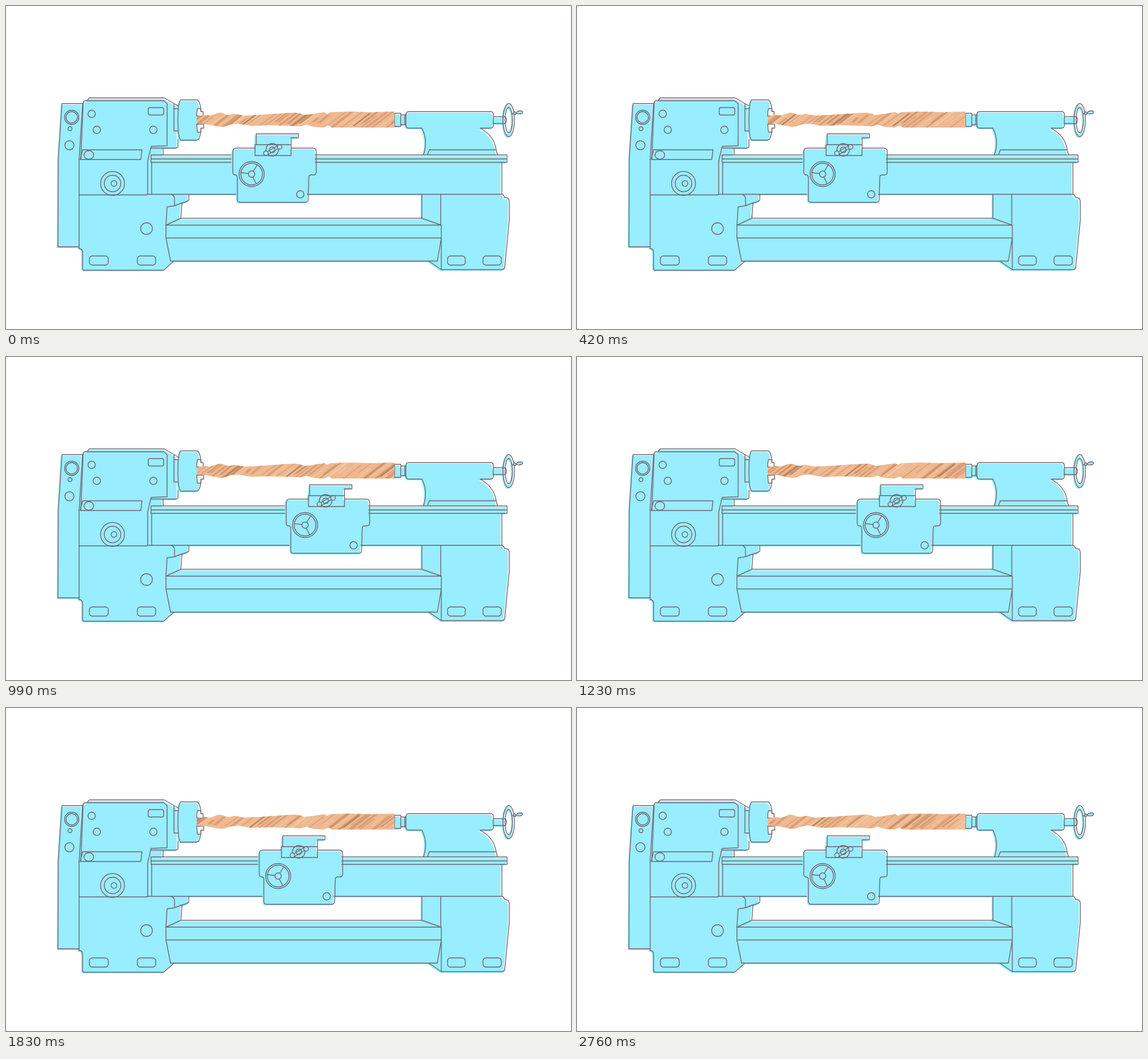
An HTML page that plays this animation: 989 px wide and 566 px high, repeating every 2.97 s.

```html
<!DOCTYPE html>
<html lang="en">
<head>
<meta charset="utf-8">
<title>Lathe</title>
<style>
html, body { margin: 0; width: 100%; height: 100%; overflow: hidden; background: #fff; }
svg { display: block; width: 989px; height: 566px; }
.fill { fill: #98edff; transform: translate(-2.2px, 2px); }
.line { fill: none; stroke: #6f646c; stroke-width: 1.4; stroke-linejoin: round; stroke-linecap: round; }
</style>
</head>
<body>
<svg viewBox="0 0 989 566">
  <defs>
    <clipPath id="blank">
      <path d="M334 194L346 191L358 192L369 188Q377 185 384 190Q391 192 400 189L416 192L441 191L470 189L500 187Q513 186 522 191L531 190L557 186L562 189L568 186L600 185L640 186L680 185V213H570Q565 207 561 211L556 213L540 212L526 208L515 211L500 210L460 209L430 210L405 206Q391 207 384 211Q376 213 366 210L350 207L334 206Z"/>
    </clipPath>
  </defs>

  <g class="fill">
    <path d="M98 171H134L131 269H128V422H91L92 268Z"/>
    <path d="M135 170Q135 166 139 166H143V164L146 161H277L294 171L301 175V247L298 249H275V261H254V330H320V340Q318 345 308 346L306 372L280 384V406L288 447H293L276 463H137Q134 463 134 460V432Q134 425 128 425V269H131Z"/>
    <path d="M306 164.500H334Q339 165 341 180V220Q339 235 334 235H306Q301 232 301 200Q301 167 306 164.500Z"/>
    <path d="M254 261H877V274H868V330H254Z"/>
    <path d="M306 372H728V330H868Q872 331 872 335L879 337Q881 339 881 345V375L873 458Q872 462 868 462H762L740 447H288L280 406V384Z"/>
    <path d="M680 188H691V191H700Q700 185 705 185H848Q853 185 853 190V194H874V206H853V209Q853 214 848 214H830Q855 228 858 252L860 260H731Q738 235 728 214H705Q700 214 700 208H691V211H680Z"/>
    <path fill-rule="evenodd" d="M870 200a10 29 0 1 1 20 0a10 29 0 1 1 -20 0M873.500 200a6.500 22 0 1 0 13 0a6.500 22 0 1 0 -13 0"/>
  </g>

  <g class="line">
    <path d="M134 171H98L91.500 268L91 422H128M134 171L128 269"/>
    <path d="M143 166V164L146 161H277L294 171L301 175M131 269L135 170Q135 166 139 166H276L282 171V245L254 246L248 272V330M294 171V180H301M294 180V219H301"/>
    <path d="M301 234V247L298 249H254M275 249V261M134 252H238L236 269H130ZM128 269V425Q134 425 134 432V460Q134 463 137 463H276L293 448M128 331H247"/>
    <path d="M306 164.500H334Q339 165 341 180V220Q339 235 334 235H306Q301 232 301 200Q301 167 306 164.500Z"/>
    <path d="M254 261H877V274H254ZM254 268H877M255 274V330M247 330H868V274"/>
    <path d="M289 330Q295 332 295 338V350L282 352L280 384M320 330V340Q318 343 308 345L295 350M308 346L306 372"/>
    <path d="M306 372H728L762 384H280ZM280 384V406.500H762V384M280 406.500L288 447H755L762 406.500M728 330V372M761 330V384M762 406.500V462"/>
    <path d="M868 330Q872 331 872 335L879 337Q881 339 881 345V375L873 458Q872 462 868 462H762L740 447"/>
    <path d="M680 188H691V211H680ZM691 191H700M691 208H700M698 191V208"/>
    <path d="M728 214H705Q700 214 700 208V191Q700 185 705 185H848Q853 185 853 190V209Q853 214 848 214H830Q855 228 858 252H741L738 260M728 214Q739 235 731 260M858 252L860 260"/>
    <path d="M853 194H874Q878 200 874 206H853"/>
    <ellipse cx="880" cy="200" rx="10" ry="29"/><ellipse cx="880" cy="200" rx="6.500" ry="22"/>
    <path fill="#98edff" d="M887 189L890 185L893 187Q896 183 903 184Q906 187 902 188.500Q896 190 893 188L892 190Z"/>
    <ellipse cx="145" cy="261" rx="8.500" ry="7.500"/>
    <g id="details"></g>
  </g>

  <path class="line" style="fill:#fff" d="M335 180H341V185H345V193H334V187ZM334 207H346V214H341V221H335Z"/>

  <g clip-path="url(#blank)">
    <path fill="#eeb88f" d="M330 180H684V218H330Z"/>
    <g id="grain"></g>
  </g>

  <g id="carriage">
    <g class="fill">
      <path d="M403 249H537Q543 249 543 255V291Q543 296 538 296H535Q530 296 530 300L529 339Q529 344 524 344H410Q405 344 405 339V301Q405 296 401 296Q397 296 397 291V255Q397 249 403 249Z"/>
      <path d="M438 224H512V231H499V262H436V243Z"/>
    </g>
    <g class="line">
      <path d="M436 249H403Q397 249 397 255V291Q397 296 401 296Q405 296 405 301V339Q405 344 410 344H524Q529 344 529 339L530 300Q530 296 535 296H538Q543 296 543 291V255Q543 249 537 249H499"/>
      <path d="M438 224H512V231H499V262H436V243H499M438 224V243"/>
      <circle cx="430" cy="294.500" r="22"/><circle cx="430" cy="294.500" r="19"/><circle cx="430" cy="294.500" r="5.500"/>
      <path d="M424.500 293.500L411 292M433 289.500L440 278M432 299.500L438 311.500"/>
      <circle cx="466" cy="252" r="11"/><circle cx="466" cy="252" r="5"/>
      <path d="M458 255L475 245M459 260L476 250"/>
      <circle cx="455" cy="258" r="4" fill="#98edff"/><circle cx="479" cy="247" r="4" fill="#98edff"/>
      <circle cx="515" cy="330" r="6.500"/>
    </g>
  </g>
</svg>
<script>
const LOOP = 2970, SPIN_END = 2370, TRAVEL = 93.5;
const byId = id => document.getElementById(id);

function add(parent, tag, attrs) {
  const el = document.createElementNS("http://www.w3.org/2000/svg", tag);
  for (const key in attrs) el.setAttribute(key, attrs[key]);
  parent.appendChild(el);
}

// Holes, dials and slots: [cx, cy, r] and [x, y, width, height, radius]
const holes = [
  [115, 195, 12.5], [115, 195, 10], [112, 215, 3.5], [111, 244, 8],
  [150, 189, 6.5], [159, 217, 6.5], [258, 217, 6.5],
  [186.5, 311, 21], [186.5, 311, 14.5], [189, 311, 5], [246, 390, 10.3]
];
const slots = [
  [146, 438, 33, 16, 5], [230, 438, 32, 16, 5],
  [773, 438, 31, 16, 5], [835, 438, 32, 16, 5], [249, 178, 27, 13, 3]
];
for (const [cx, cy, r] of holes) add(byId("details"), "circle", { cx, cy, r });
for (const [x, y, width, height, rx] of slots)
  add(byId("details"), "rect", { x, y, width, height, rx });

let seed = 17;
const random = () => (seed = seed * 16807 % 2147483647) / 2147483647;

// A slanted streak of wood, centred on x, running between two heights
function streak(x, width, fill, top = 183, bottom = 215) {
  const at = y => x + (199 - y) * 1.4;
  const d = `M${at(bottom)} ${bottom}L${at(top) - width / 2} ${top}L${at(top) + width / 2} ${top}L${at(bottom) + width} ${bottom}Z`;
  add(byId("grain"), "path", { d, fill });
}

const tones = ["#f4c6a2", "#dba07a", "#d99b73", "#f1c09b", "#cf946c"];
for (let x = 90; x < 730; x += 6 + random() * 7) {
  const tone = tones[Math.floor(random() * tones.length)];
  const top = random() < 0.4 ? 188 + random() * 8 : 183;
  const bottom = random() < 0.4 ? 203 + random() * 7 : 215;
  streak(x, 2 + random() * 6, tone, top, bottom);
}
for (const x of [225, 315, 422, 586]) {
  streak(x, 4, "#b5825f", 188, 210);
  streak(x + 9, 1.5, "#bd8964", 186, 206);
}
streak(485, 3, "#cb946e");
streak(600, 9, "#d99d75");

// Smooth ramp from 0 to 1
function ramp(t, start, end) {
  const u = Math.min(1, Math.max(0, (t - start) / (end - start)));
  return u * u * (3 - 2 * u);
}

function draw(now) {
  const t = now % LOOP;
  const slide = TRAVEL * (ramp(t, 430, 790) - ramp(t, 1650, 2010));
  const turn = 200 * Math.max(0, 1 - t / SPIN_END) ** 1.65;
  byId("carriage").setAttribute("transform", `translate(${slide} 0)`);
  byId("grain").setAttribute("transform", `translate(${turn} 0)`);
}

const began = performance.now();
function tick() {
  draw(performance.now() - began);
  requestAnimationFrame(tick);
}
tick();
</script>
</body>
</html>
```
